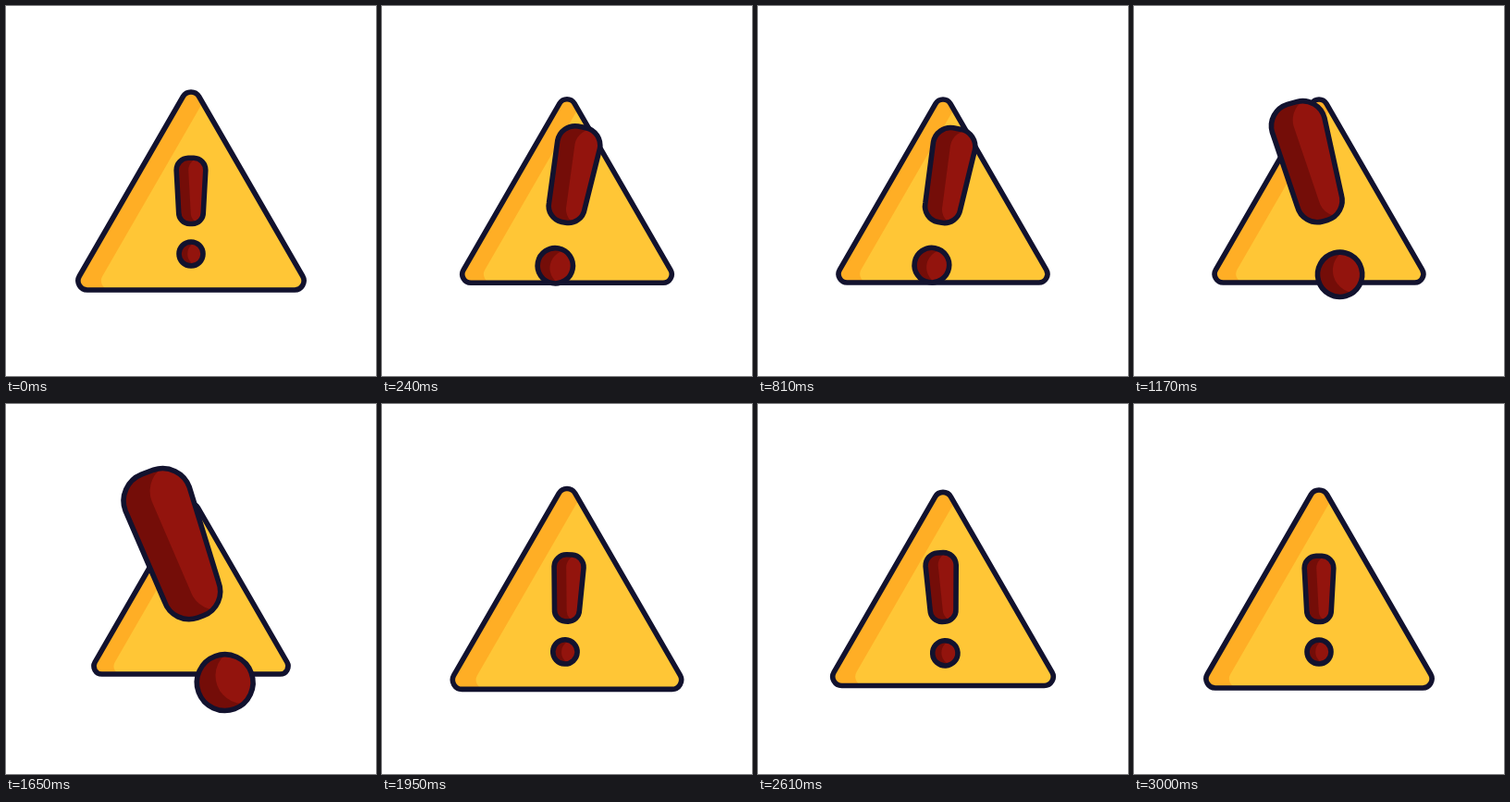
Recreate the animation shown at these times as an HTML page. Size 400 px wide and 400 px high, loop 5.03 s.

```html
<!DOCTYPE html>
<html lang="en">
<head>
<meta charset="utf-8">
<title>Warning sign</title>
<style>
  html, body { margin: 0; width: 100%; height: 100%; overflow: hidden; background: #fff; }
  svg { display: block; width: 100%; height: 100%; }
  .outline { fill: none; stroke: #12122e; stroke-width: inherit; }
</style>
</head>
<body>
<svg viewBox="0 0 400 400">
  <defs>
    <path id="tri" d="M-8.7 -102A10 10 0 0 1 8.7 -102L120.7 92A10 10 0 0 1 112 107H-112A10 10 0 0 1 -120.7 92Z"/>
    <path id="bar" d="M-15.8 -45A13.2 13.2 0 0 1 -3 -58.3H3A13.2 13.2 0 0 1 15.8 -45L13.3 .8A12 12 0 0 1 1.5 13H-1.5A12 12 0 0 1 -13.3 .8Z"/>
    <circle id="dot" cy="45.5" r="13"/>
    <clipPath id="triClip"><use href="#tri"/></clipPath>
    <clipPath id="barClip"><use href="#bar"/></clipPath>
    <clipPath id="dotClip"><use href="#dot"/></clipPath>
  </defs>
  <g id="sign">
    <use href="#tri" fill="#ffae25"/>
    <g clip-path="url(#triClip)"><use href="#tri" x="25" fill="#ffc636"/></g>
    <use href="#tri" class="outline"/>
  </g>
  <g id="mark">
    <use href="#bar" fill="#740d08"/>
    <g clip-path="url(#barClip)"><use href="#bar" x="13" fill="#93140d"/></g>
    <use href="#bar" class="outline"/>
    <use href="#dot" fill="#740d08"/>
    <g clip-path="url(#dotClip)"><use href="#dot" x="9.2" fill="#93140d"/></g>
    <use href="#dot" class="outline"/>
  </g>
</svg>
<script>
const LOOP = 5030, MOVE = 3000, STEP = 30, LINE = 5.6;
const RELEASE = 1640;       // the mark lets go of its left pose and springs back
const MAX_ANGLE = 20.6;

// Sizes of the sign at its turning points: [time in ms, scale].
const signSizes = [[0, 1], [470, .86], [960, .943], [1635, .86], [2205, 1.123], [2640, .975], [MOVE, 1]];

const ease = u => (1 - Math.cos(Math.PI * Math.min(u, 1))) / 2;

function signScale(t) {
  const next = Math.max(1, signSizes.findIndex(([time]) => time >= t));
  const [t0, from] = signSizes[next - 1], [t1, to] = signSizes[next];
  return from + (to - from) * ease((t - t0) / (t1 - t0));
}

// 1 leans fully right, -1 fully left, 0 is upright.
function swing(t) {
  if (t < RELEASE) return ease(t / 460) * Math.tanh((942 - t) / 232);
  const since = t - RELEASE;
  const turns = 1.25 * since / (MOVE - RELEASE);
  return -Math.exp(-since / 560) * Math.cos(2 * Math.PI * turns);
}

function place(id, y, angle, scale) {
  const part = document.getElementById(id);
  part.setAttribute("transform", `translate(200 ${y}) rotate(${angle}) scale(${scale})`);
  part.setAttribute("stroke-width", LINE / scale);
}

function draw(now) {
  const t = Math.min(Math.floor(now % LOOP / STEP) * STEP, MOVE);
  const size = signScale(t), lean = swing(t);
  const bulge = Math.abs(lean) ** 1.7;
  // The mark grows as it leans and shrinks while the sign swells.
  const markScale = 1 + 1.38 * bulge - 2.1 * Math.max(0, size - 1);
  place("sign", 200, 0, size);
  place("mark", 222.5 - 21.8 * bulge, MAX_ANGLE * lean, markScale);
}

const start = performance.now();
function tick() {
  draw(performance.now() - start);
  requestAnimationFrame(tick);
}
tick();
</script>
</body>
</html>
```
